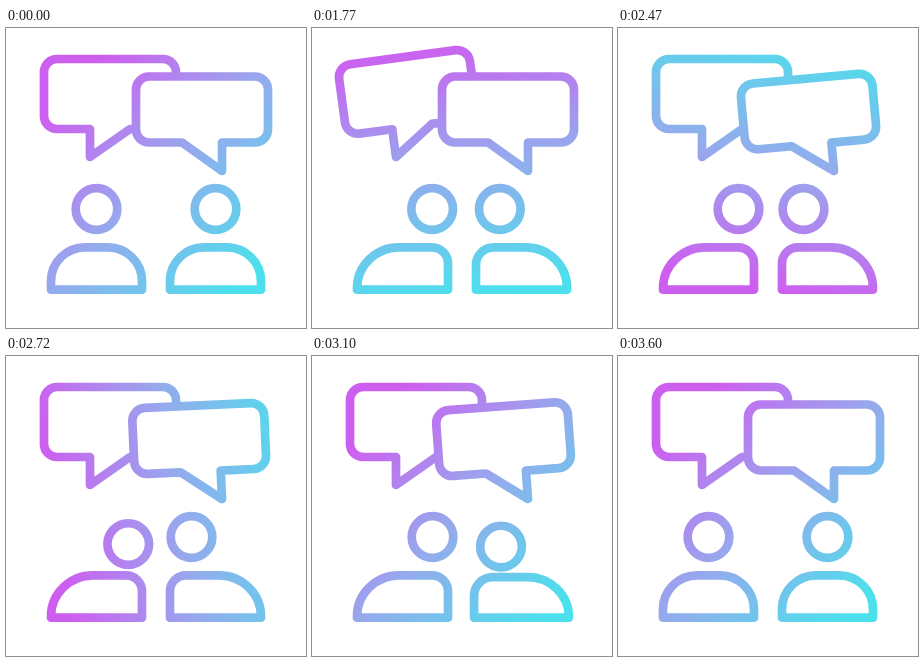
Write an HTML page that moves like this. It is 300 px wide and 300 px high and loops after 3.62 s.

```html
<!DOCTYPE html>
<html lang="en">
<head>
<meta charset="utf-8">
<title>Conversation</title>
<style>
  html, body { margin: 0; width: 100%; height: 100%; overflow: hidden; background: #fff; }
  svg { display: block; width: 100vw; height: 100vh; }
  #ink * { fill: none; stroke: #fff; stroke-width: 8.7; stroke-linejoin: round; }
  #ink #bubbleR { fill: #000; }
</style>
</head>
<body>
<svg viewBox="0 0 300 300">
  <defs>
    <linearGradient id="tint" gradientUnits="userSpaceOnUse" x1="46" y1="135" x2="302" y2="135">
      <stop offset="0" stop-color="#cd5ff0"/>
      <stop offset=".5" stop-color="#94abed"/>
      <stop offset="1" stop-color="#4ce0ec"/>
    </linearGradient>
    <mask id="ink" maskUnits="userSpaceOnUse" x="0" y="0" width="300" height="300">
      <path id="bubbleL"/>
      <path id="bubbleR"/>
      <circle id="headL" r="20.800"/>
      <circle id="headR" r="20.800"/>
      <path id="bodyL"/>
      <path id="bodyR" transform="matrix(-1 0 0 1 300 0)"/>
    </mask>
  </defs>
  <rect width="300" height="300" fill="url(#tint)" mask="url(#ink)"/>
</svg>
<script>
const LOOP = 3620, START = 1520, STEP = 25;
const $ = id => document.getElementById(id);
const clamp = u => Math.min(1, Math.max(0, u));
const mix = (a, b, u) => a + (b - a) * u;
const ramp = (t, from, len) => (1 - Math.cos(Math.PI * clamp((t - from) / len))) / 2;
const bump = (t, from, len) => Math.sin(Math.PI * clamp((t - from) / len)) ** 2;

// Damped swing that speeds up as it fades.
function swing(t, from) {
  const u = clamp((t - from) / 886);
  return -24.5 * (1 - u) * Math.sin(4 * Math.PI * u ** 1.28);
}

const people = [
  { side: 'L', x: 90.5, shift: 30, turnIn: 1490, turnOut: 3170, nods: [2060, 2600],
    talk: 1505, tip: [84, 129] },
  { side: 'R', x: 209.5, shift: -24, turnIn: 1530, turnOut: 3020, nods: [],
    talk: 2432, tip: [216, 143] }
];

// Drawn from the tail's tip; dir is the side the wide part lies on.
function bubblePath([x, y], dir, tail, height) {
  const r = 13, sweep = dir > 0 ? 0 : 1;
  const arc = (dx, dy) => `a${r} ${r} 0 0 ${sweep} ${dx * dir * r} ${dy * r}`;
  return `M${x} ${y}l${40 * dir} ${-tail}h${33 * dir}` + arc(1, -1) +
         `v${2 * r - height}` + arc(-1, -1) + `h${-106 * dir}` + arc(-1, 1) +
         `v${height - 2 * r}` + arc(1, 1) + `h${33 * dir}Z`;
}

function bodyPath(turn, squash) {
  const l = 45 - squash, r = 136 + squash, top = 219.3 + squash;
  const rx = mix(34, 42, turn), ry = mix(34, 41, turn), rr = mix(34, 16, turn);
  return `M${l} 261.700V${top + ry}A${rx} ${ry} 0 0 1 ${l + rx} ${top}H${r - rr}` +
         `A${rr} ${rr} 0 0 1 ${r} ${top + rr}V261.700Z`;
}

function pose(p, t) {
  const turn = ramp(t, p.turnIn, 300) - ramp(t, p.turnOut, 300);
  const crouch = bump(t, p.turnIn, 240) + bump(t, p.turnOut - 20, 220);
  const nod = p.nods.reduce((sum, from) => sum + bump(t, from, 310), 0);
  const head = $('head' + p.side);
  head.setAttribute('cx', p.x + p.shift * turn + 2 * nod);
  head.setAttribute('cy', 181 + 10 * crouch + 8 * nod);
  $('body' + p.side).setAttribute('d', bodyPath(turn, 2 * crouch));
  $('bubble' + p.side).setAttribute('transform', `rotate(${swing(t, p.talk)} ${p.tip})`);
}

function draw(now) {
  const time = now % LOOP;
  const t = time < START ? 0 : START + Math.floor((time - START) / STEP) * STEP;
  people.forEach(p => pose(p, t));
  const angle = 45 + 360 * ramp(t, 1416, 1750);
  $('tint').setAttribute('gradientTransform', `rotate(${angle} 174 135)`);
}

$('bubbleL').setAttribute('d', bubblePath(people[0].tip, 1, 28, 70));
$('bubbleR').setAttribute('d', bubblePath(people[1].tip, -1, 28.5, 66));

const begin = performance.now();
function tick() {
  draw(performance.now() - begin);
  requestAnimationFrame(tick);
}
tick();
</script>
</body>
</html>
```
